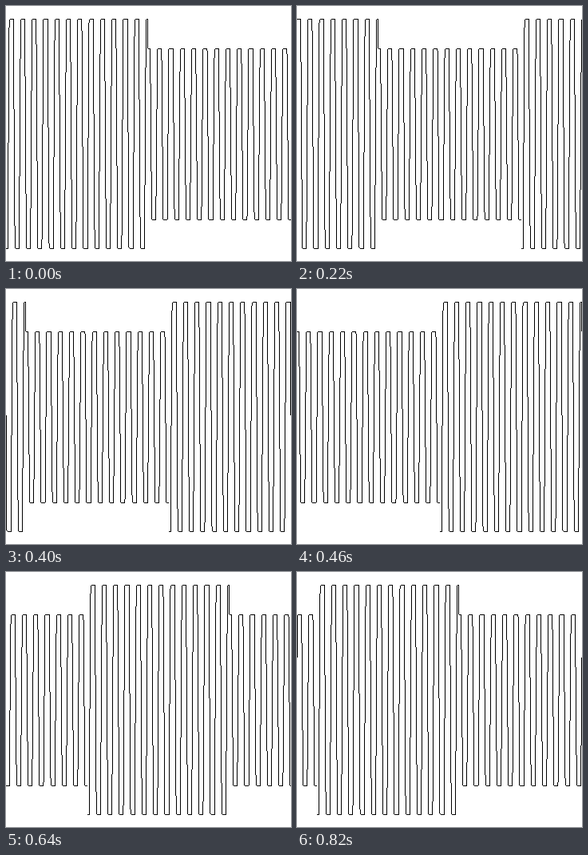
Animation, 357 px wide and 319 px high, one loop 0.88 s. Source, as an HTML page with a canvas:

```html
<!DOCTYPE html>
<html lang="en">
<head>
<meta charset="utf-8">
<title>Scrolling square wave</title>
<style>
  html, body { margin: 0; width: 100%; height: 100%; overflow: hidden; background: #fff; }
  canvas { display: block; width: 357px; height: 319px; }
</style>
</head>
<body>
<canvas id="stage" width="357" height="319"></canvas>
<script>
const W = 357, H = 319;
const MID = 159.9, TALL = 143.5, SHORT = 107;
const CYCLES = 25, GAIN = 2.35;
const FIRST_HOLD = 100, HOLD = 60, STEPS = 14;
const LOOP = FIRST_HOLD + HOLD * (STEPS - 1);

const stage = document.getElementById('stage').getContext('2d');
const tile = document.createElement('canvas');
tile.width = W;
tile.height = H;
const pen = tile.getContext('2d');

// Clipped cosine; the second half is lower
function waveY(x) {
  const u = (x + 0.5) / W;
  const c = -GAIN * Math.cos(2 * Math.PI * CYCLES * u);
  const amp = u < 0.5 ? TALL : SHORT;
  return Math.round(MID - amp * Math.max(-1, Math.min(1, c)));
}

// Each column runs from its own height up to that of the next column
function drawTile() {
  pen.fillStyle = '#fff';
  pen.fillRect(0, 0, W, H);
  pen.fillStyle = '#000';
  for (let x = 0; x < W; x++) {
    const y = waveY(x);
    const next = waveY(Math.min(x + 1, W - 1));
    const top = next < y ? next + 1 : y;
    pen.fillRect(x, top, 1, Math.max(1, Math.abs(next - y)));
  }
}

// Half pixels go to the even neighbour
function shiftAt(step) {
  const s = step * W / STEPS;
  return step % 2 ? 2 * Math.round(s / 2) : s;
}

function render(now) {
  const t = now % LOOP;
  const step = t < FIRST_HOLD ? 0 : 1 + Math.floor((t - FIRST_HOLD) / HOLD);
  const shift = shiftAt(step);
  stage.drawImage(tile, -shift, 0);
  stage.drawImage(tile, W - shift, 0);
}

let start = null;
function tick() {
  const now = performance.now();
  if (start === null) start = now;
  render(now - start);
  requestAnimationFrame(tick);
}

drawTile();
render(0);
requestAnimationFrame(tick);
</script>
</body>
</html>
```
